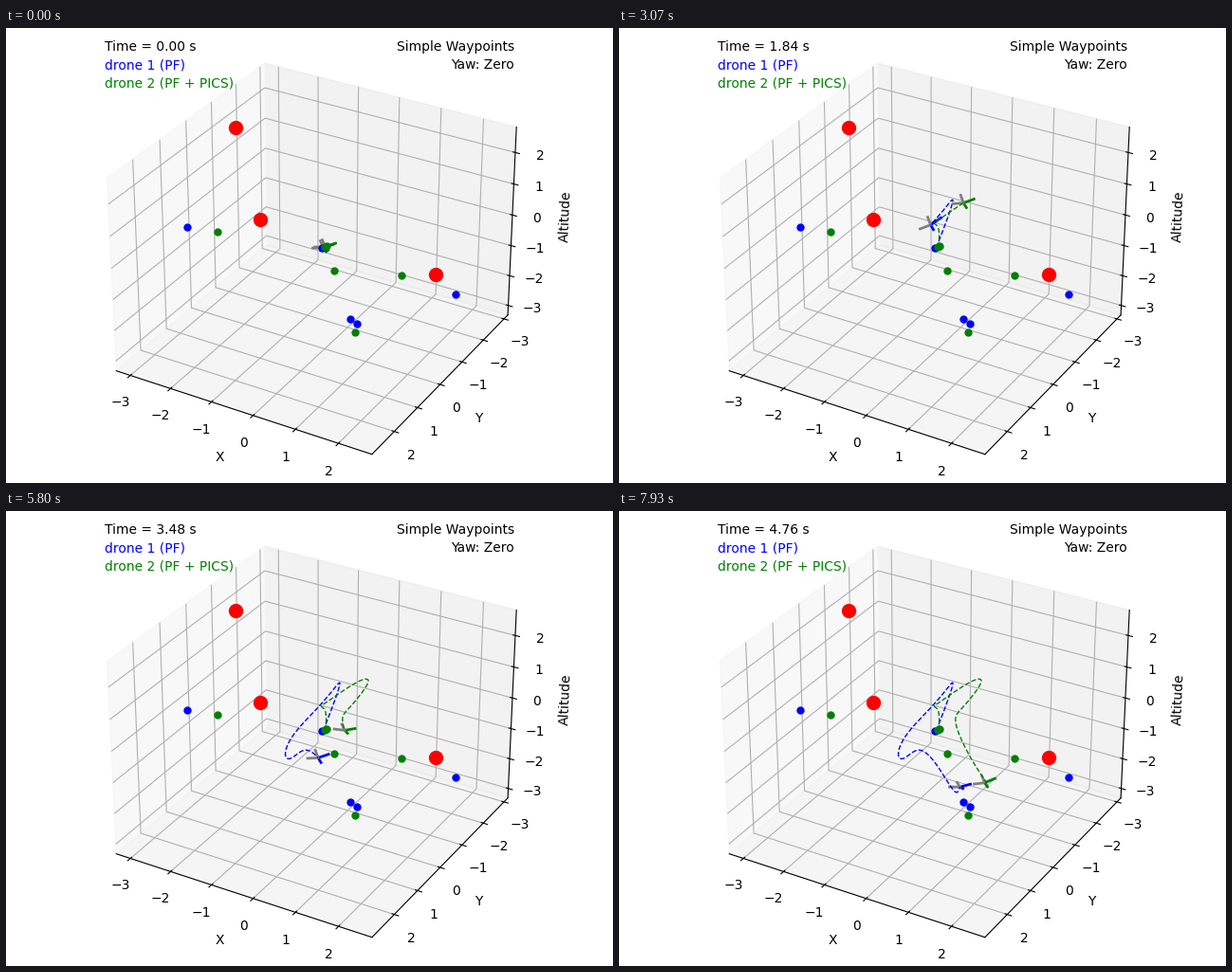
These frames come from a looping animation (640x480 px, 8000 ms). A matplotlib script:

```python
import numpy as np
import matplotlib.pyplot as plt
from matplotlib.animation import FuncAnimation

STEPS = 120           # simulation steps per loop
FRAMES = 2 * STEPS    # each step is held for two frames
STEP_TIME = 0.04      # simulated seconds per step

# Turning points of each flight: step, then x and y in pixels
FLIGHT_1 = [(0, 335, 232.5), (18, 341, 217), (34, 352.3, 182), (46, 329, 208.5),
            (52, 305, 235), (59, 295, 257), (66, 300, 262), (78, 316, 253),
            (99, 346, 285), (112, 357, 297.5), (119, 360, 292), (128, 366, 280)]
FLIGHT_2 = [(0, 337, 231.5), (10, 338, 224), (18, 337, 211.5), (26, 333, 207),
            (34, 338.5, 202.5), (52, 376, 179), (59, 382.5, 180), (75, 361.5, 209.5),
            (82, 355.3, 220), (99, 376, 269), (112, 389, 289), (119, 386, 287.5),
            (128, 376, 280)]


def spline(keys):
    """Natural cubic spline through the keys: position and acceleration per step."""
    keys = np.array(keys, float)
    t, p = keys[:, 0], keys[:, 1:]
    h = np.diff(t)
    slope = np.diff(p, axis=0) / h[:, None]
    system, rhs = np.eye(len(t)), np.zeros_like(p)
    for k in range(1, len(t) - 1):
        system[k, k - 1:k + 2] = h[k - 1], 2 * (h[k - 1] + h[k]), h[k]
        rhs[k] = 6 * (slope[k] - slope[k - 1])
    curve = np.linalg.solve(system, rhs)

    s = np.arange(STEPS)
    i = np.searchsorted(t, s, side="right") - 1
    h = h[i][:, None]
    u = (s - t[i])[:, None] / h
    v = 1 - u
    pos = (v * p[i] + u * p[i + 1]
           + h ** 2 / 6 * ((v ** 3 - v) * curve[i] + (u ** 3 - u) * curve[i + 1]))
    return pos, v * curve[i] + u * curve[i + 1]


class Drone:
    def __init__(self, stage, flight, color):
        self.path, self.accel = spline(flight)
        self.front, = stage.plot([], [], lw=2, color=color)
        self.back, = stage.plot([], [], lw=2, color="gray")
        self.trail, = stage.plot([], [], "--", lw=1, color=color)

    def show(self, step):
        pos = self.path[step]
        ax_, ay_ = self.accel[step]
        # The frame leans into its acceleration
        lean_left = 0.1 - 2 * ax_
        lean_right = np.clip(4 * (ax_ - ay_), -0.2, 1)
        left = np.array([11, -1.5 - 5.2 * lean_left])
        right = np.array([3, 5.5 - 5.2 * lean_right])
        hub = pos + [0, -1.6]  # motors sit slightly above the body
        self.front.set_data(*np.transpose([hub + left, pos, hub + right]))
        self.back.set_data(*np.transpose([hub - left, pos, hub - right]))
        self.trail.set_data(*self.path[:step + 1].T)


fig = plt.figure(figsize=(6.4, 4.8), dpi=100)
ax = fig.add_axes([0, 0, 1, 1], projection="3d")
ax.set_xlim3d(-3.355, 2.765)
ax.set_ylim3d(2.93, -3.19)
ax.set_zlim3d(-3.322, 2.798)
ax.set_xlabel("X")
ax.set_ylabel("Y")
ax.set_zlabel("Altitude")


def note(x, y, text, color="black", ha="left"):
    return ax.text2D(x, y, text, color=color, ha=ha, transform=ax.transAxes)


clock = note(0.05, 0.95, "")
note(0.05, 0.91, "drone 1 (PF)", "blue")
note(0.05, 0.87, "drone 2 (PF + PICS)", "green")
note(0.95, 0.95, "Simple Waypoints", ha="right")
note(0.95, 0.91, "Yaw: Zero", ha="right")

# Flat layer in pixel coordinates for waypoints and drones
stage = fig.add_axes([0, 0, 1, 1])
stage.set(xlim=(0.5, 640.5), ylim=(480.8, 0.8))
stage.axis("off")


def dots(points, color, size=25):
    stage.scatter(*np.transpose(points), s=size, color=color, zorder=4)


dots([(191, 210.5), (333, 232.5), (363.5, 307.5), (370, 312.5), (474, 281.5)], "blue")
dots([(223.5, 215.5), (336.5, 232), (338.5, 231), (346.5, 257), (368.5, 321.5),
      (417.5, 261.5)], "green")
dots([(242.7, 105.5), (268.7, 202.7), (453.5, 260.5)], "red", 100)

drones = [Drone(stage, FLIGHT_1, "blue"), Drone(stage, FLIGHT_2, "green")]


def update(frame):
    step = min((frame + 1) // 2, STEPS - 1)
    clock.set_text(f"Time = {step * STEP_TIME:.2f} s")
    for drone in drones:
        drone.show(step)


anim = FuncAnimation(fig, update, frames=FRAMES, init_func=lambda: update(0),
                     interval=8000 / FRAMES, repeat=True, repeat_delay=0)
plt.show()
```
